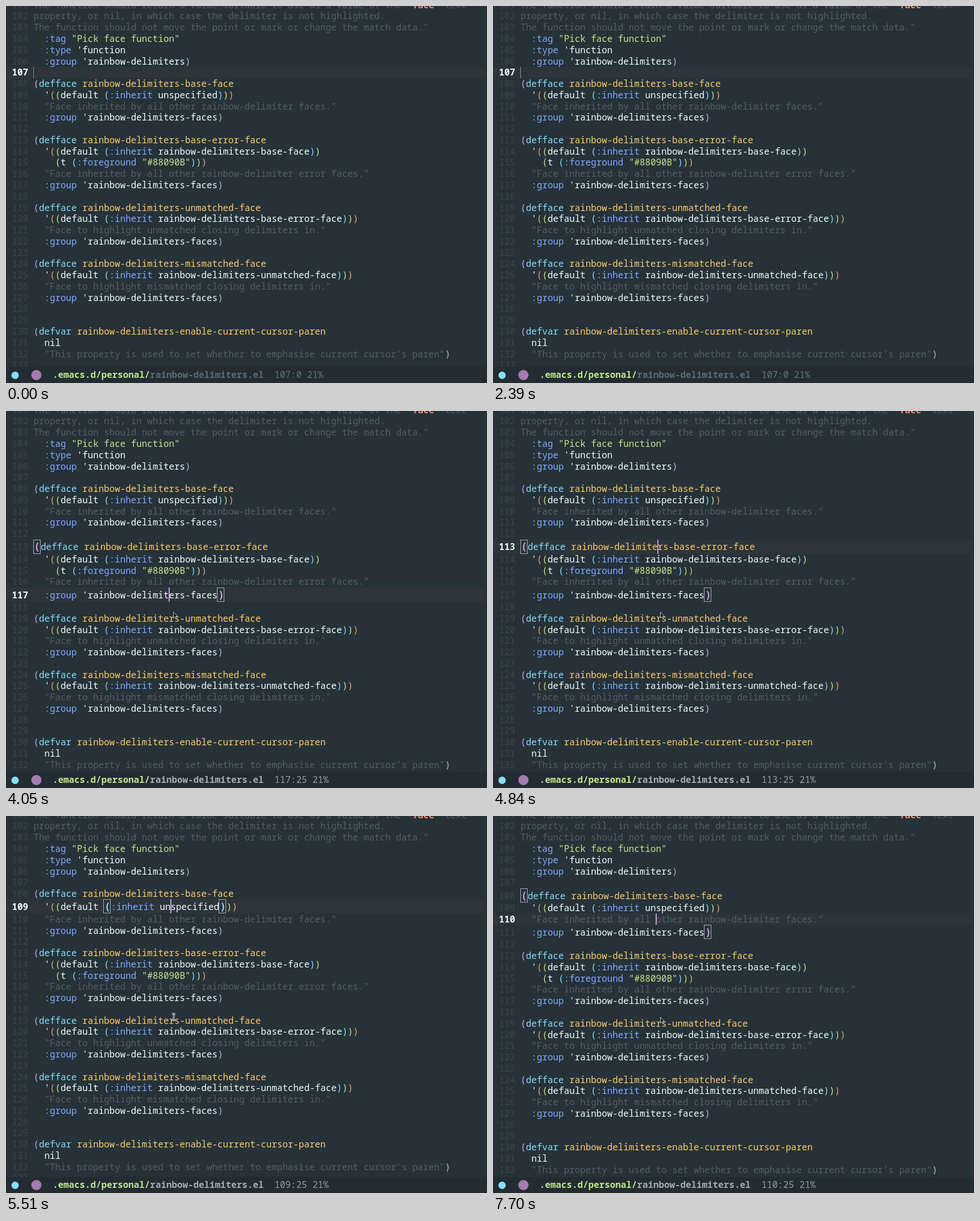
An HTML page with a canvas that plays this animation: 846 by 662 pixels, repeating every 8 s.

```html
<!DOCTYPE html>
<html lang="en">
<head>
<meta charset="utf-8">
<title>Rainbow delimiters</title>
<style>
html, body { margin: 0; width: 100%; height: 100%; overflow: hidden; background: #263238; }
canvas { display: block; }
</style>
</head>
<body>
<canvas id="stage" width="846" height="662"></canvas>
<script>
const ctx = document.getElementById('stage').getContext('2d');
const LOOP = 8000, FIRST = 101;
const LEFT = 48.5, CHAR = 9.52, SIZE = CHAR / 0.6, TOP = -11.7, ROW = 19.77;
const BOX_W = 3, BOX_H = 5.1, BOX_DROP = 3.5, BASE = 15.4;
const BAR_Y = 634;

const C = {
  bg: '#263238', row: '#2d353a', bar: '#222c32', fg: '#eeffff', dim: '#3a464c',
  doc: '#525e64', str: '#c3e88d', key: '#82aaff', def: '#89ddff', name: '#ffcb6b',
  konst: '#f78c6c', cursor: '#c792ea', idleCursor: '#8b909c', icon: '#a67bb0',
  box: '#a9aeb9'
};
const RAINBOW = ['#cda6e6', '#f7a06c', '#c3e88d', '#89ddff'];

const source = `The function should return a value suitable to use as a value of the \`face' text
property, or nil, in which case the delimiter is not highlighted.
The function should not move the point or mark or change the match data."
  :tag "Pick face function"
  :type 'function
  :group 'rainbow-delimiters)

(defface rainbow-delimiters-base-face
  '((default (:inherit unspecified)))
  "Face inherited by all other rainbow-delimiter faces."
  :group 'rainbow-delimiters-faces)

(defface rainbow-delimiters-base-error-face
  '((default (:inherit rainbow-delimiters-base-face))
    (t (:foreground "#88090B")))
  "Face inherited by all other rainbow-delimiter error faces."
  :group 'rainbow-delimiters-faces)

(defface rainbow-delimiters-unmatched-face
  '((default (:inherit rainbow-delimiters-base-error-face)))
  "Face to highlight unmatched closing delimiters in."
  :group 'rainbow-delimiters-faces)

(defface rainbow-delimiters-mismatched-face
  '((default (:inherit rainbow-delimiters-unmatched-face)))
  "Face to highlight mismatched closing delimiters in."
  :group 'rainbow-delimiters-faces)


(defvar rainbow-delimiters-enable-current-cursor-paren
  nil
  "This property is used to set whether to emphasise current cursor's paren")
`.split('\n');

// Time, line, column of the text cursor
const moves = [
  [0, 107, 0], [3630, 119, 25], [3920, 118, 0], [4050, 117, 25], [4250, 116, 25],
  [4440, 115, 25], [4650, 114, 25], [4840, 113, 25], [4980, 112, 0], [5170, 111, 25],
  [5310, 110, 25], [5510, 109, 25], [6040, 108, 25], [6770, 109, 25], [7700, 110, 25]
];
const blinks = [[6580, 6770], [7240, 7700]];

// Time, shape, position of the mouse pointer
const pointers = [
  [0], [150, arrow, 814, 576], [220], [3130, arrow, 336, 420], [3190, arrow, 321, 401],
  [3250, arrow, 306, 382], [3450, arrow, 300, 365], [3540, arrow, 294.5, 353],
  [5510, beam, 295, 353], [7700, arrow, 294.5, 353]
];

const pairs = [];
const rows = parse();

function parse() {
  const open = [];
  return source.map((text, i) => {
    const line = FIRST + i;
    // The first lines continue a docstring that began above
    if (line < 104) {
      const at = text.indexOf('`face');
      if (at < 0) return [{ col: 0, text, color: C.doc }];
      return [
        { col: 0, text: text.slice(0, at + 1), color: C.doc },
        { col: at + 1, text: 'face', color: C.konst, bold: true },
        { col: at + 5, text: text.slice(at + 5), color: C.doc }
      ];
    }
    let last = '';
    return [...text.matchAll(/"[^"]*"|:\w+|[()]|[^\s"():]+/g)].map(m => {
      const tok = { col: m.index, text: m[0], color: C.fg };
      if (m[0] === '(') {
        tok.paren = true;
        tok.color = RAINBOW[open.length % 4];
        open.push({ line, col: m.index });
      } else if (m[0] === ')') {
        tok.paren = true;
        const from = open.pop();
        if (from) pairs.push({ from, to: { line, col: m.index } });
        tok.color = RAINBOW[open.length % 4];
      } else if (m[0][0] === '"') {
        tok.color = text.slice(0, m.index).trim() ? C.str : C.doc;
      } else if (m[0][0] === ':') {
        tok.color = C.key;
      } else if (/^def(face|var)$/.test(m[0])) {
        tok.color = C.def;
      } else if (/^def(face|var)$/.test(last)) {
        tok.color = C.name;
      }
      last = m[0];
      return tok;
    });
  });
}

const rank = p => p.line * 1000 + p.col;

function enclosing(point) {
  const at = rank(point);
  return pairs
    .filter(p => rank(p.from) < at && rank(p.to) >= at)
    .sort((a, b) => rank(b.from) - rank(a.from))[0];
}

function latest(list, t) {
  return list.reduce((found, step) => step[0] <= t ? step : found);
}

function write(text, x, y, color, bold, size = SIZE) {
  ctx.font = `${bold ? 'bold ' : ''}${size}px "Noto Sans Mono", "DejaVu Sans Mono", monospace`;
  ctx.fillStyle = color;
  ctx.fillText(text, x, y);
}

function disc(x, y, r, color) {
  ctx.fillStyle = color;
  ctx.beginPath();
  ctx.arc(x, y, r, 0, 7);
  ctx.fill();
}

function shape(points, x, y) {
  ctx.beginPath();
  points.forEach(([px, py]) => ctx.lineTo(x + px, y + py));
}

function arrow(x, y) {
  shape([[0, 0], [0, 10.5], [2.4, 8.3], [4, 12], [5.6, 11.3], [4.1, 7.8], [7.2, 7.6]], x, y);
  ctx.closePath();
  ctx.fillStyle = '#11171a';
  ctx.fill();
  ctx.strokeStyle = '#c8cfd2';
  ctx.lineWidth = 0.9;
  ctx.stroke();
}

function beam(x, y) {
  for (const [color, width] of [['#d5dadc', 2.8], ['#1a2225', 0.9]]) {
    ctx.strokeStyle = color;
    ctx.lineWidth = width;
    for (const s of [-1, 1]) {
      shape([[-3, 5.5 * s], [-1, 5.5 * s], [0, 4.5 * s], [0, 0]], x, y);
      ctx.stroke();
      shape([[3, 5.5 * s], [1, 5.5 * s], [0, 4.5 * s]], x, y);
      ctx.stroke();
    }
  }
}

function drawCode(point, focused, cursorOn) {
  const pair = enclosing(point);
  const ends = pair ? [pair.from, pair.to] : [];
  let top = TOP;
  rows.forEach((tokens, i) => {
    const line = FIRST + i;
    const boxes = ends.filter(p => p.line === line).map(p => p.col);
    const height = ROW + (boxes.length ? BOX_H : 0);
    const base = top + BASE + (boxes.length ? BOX_DROP : 0);
    const xAt = col => LEFT + col * CHAR + BOX_W * boxes.filter(b => b < col).length;
    const current = line === point.line;

    if (current) {
      ctx.fillStyle = C.row;
      ctx.fillRect(0, Math.round(top), 842, Math.round(height));
    }
    write(String(line), LEFT - 4 * CHAR, base, current ? C.fg : C.dim, current);
    for (const tok of tokens) {
      const x = xAt(tok.col);
      if (tok.paren && boxes.includes(tok.col)) {
        write(tok.text, x + 1, base, tok.color, true, SIZE * 1.1);
        ctx.strokeStyle = C.box;
        ctx.lineWidth = 1;
        ctx.strokeRect(Math.round(x) - 0.5, Math.round(top) + 0.5, 12, 24);
      } else {
        write(tok.text, x, base, tok.color, tok.bold);
      }
    }
    if (current && cursorOn) {
      ctx.fillStyle = focused ? C.cursor : C.idleCursor;
      ctx.fillRect(Math.floor(xAt(point.col)), Math.round(top), focused ? 2 : 1, Math.round(height));
    }
    top += height;
  });
}

function drawBar(point, focused) {
  ctx.fillStyle = C.bar;
  ctx.fillRect(0, BAR_Y, 846, 662 - BAR_Y);
  disc(16, 648.5, 6.5, C.def);
  disc(53.5, 648, 9, C.icon);
  write('.emacs.d/personal/', 82, 653.3, C.str, true);
  write('rainbow-delimiters.el', 82 + 18 * CHAR, 653.3, focused ? '#a3afb4' : '#5d6b72', true);
  write(`${point.line}:${point.col} 21%`, 82 + 41 * CHAR, 653.3, focused ? '#929ea3' : '#66747a');
}

function draw(t) {
  const [, line, col] = latest(moves, t);
  const point = { line, col };
  const focused = t >= moves[1][0];
  const cursorOn = !blinks.some(([a, b]) => t >= a && t < b);
  ctx.fillStyle = C.bg;
  ctx.fillRect(0, 0, 846, 662);
  drawCode(point, focused, cursorOn);
  drawBar(point, focused);
  const [, pointer, x, y] = latest(pointers, t);
  if (pointer) pointer(x, y);
}

const start = performance.now();
function tick() {
  draw((performance.now() - start) % LOOP);
  requestAnimationFrame(tick);
}
tick();
</script>
</body>
</html>
```
